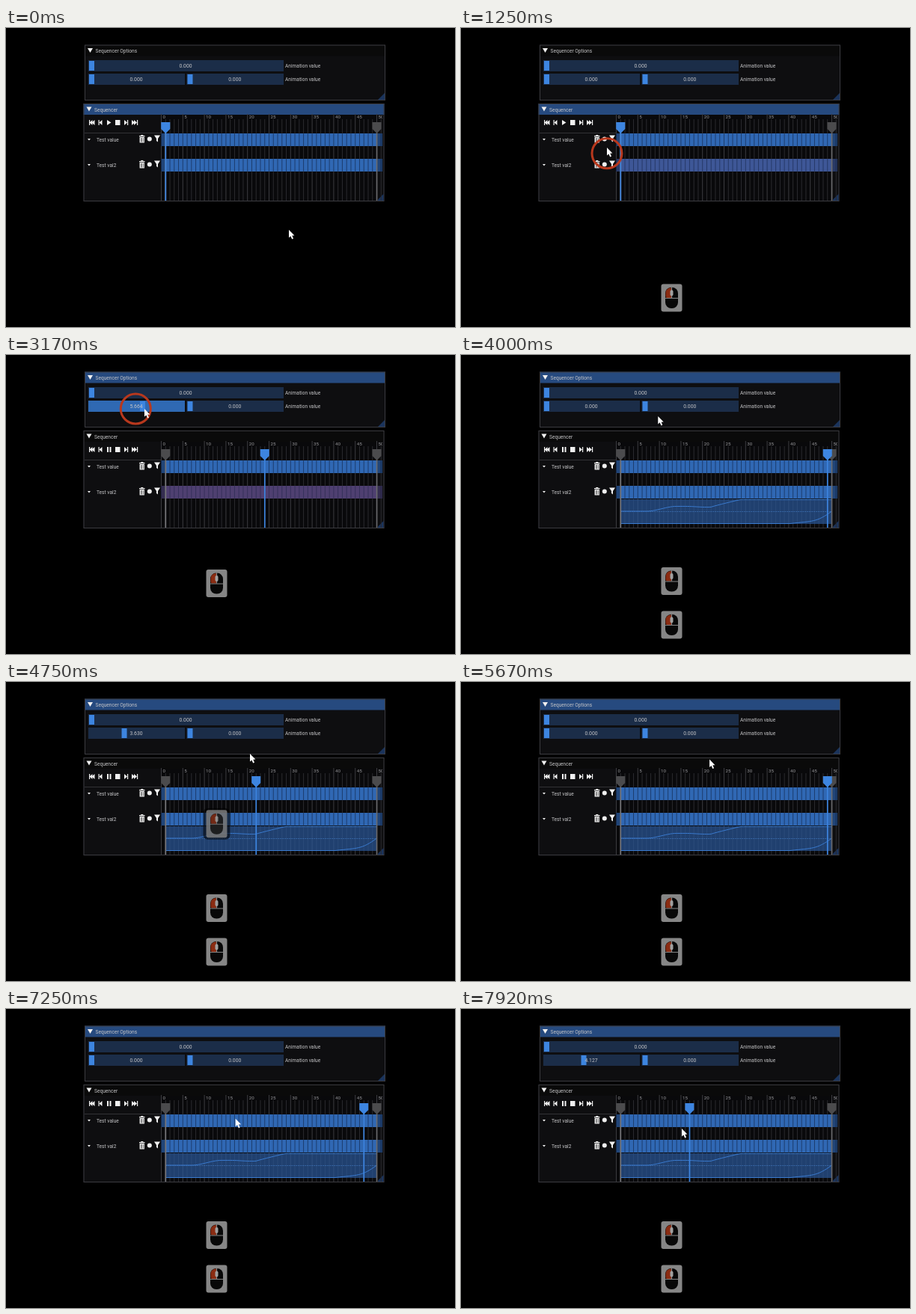
An HTML page with a canvas for the animation above (8 s loop, 600 by 400 pixels).

```html
<!DOCTYPE html>
<html lang="en">
<head>
<meta charset="utf-8">
<style>
html, body { margin: 0; width: 100%; height: 100%; overflow: hidden; background: #000; }
canvas { display: block; }
</style>
</head>
<body>
<canvas id="stage" width="600" height="400"></canvas>
<script>
const ctx = document.getElementById('stage').getContext('2d');
const LOOP = 8000, RECORD = 1080, DRAG = 2375, RELEASE = 3580;
const FRAME = 5.76, ORIGIN = 207.5, START = ORIGIN + FRAME, END = ORIGIN + 50 * FRAME;
const BLUE = '#3d85e0', WHITE = '#f0f0f0', GRAY = '#4b4b4d', BACK = '#0e0e10';

// Rows of [time, x, y]; the slider leads the cursor between DRAG and RELEASE
const stops = [
  [0, 378, 270], [170, 378, 270], [700, 196, 118], [920, 195, 176], [1150, 195, 176],
  [1250, 195, 160], [1700, 110, 56], [2050, 118, 69], [DRAG, 117, 70],
  [RELEASE, 237, 76], [4750, 326, 96], [6580, 338, 111], [7600, 295, 160], [LOOP, 295, 160]];

const clamp = v => Math.min(1, Math.max(0, v));
const smooth = (a, b, v) => (v = clamp((v - a) / (b - a)), v * v * (3 - 2 * v));

// Recorded curve over the playhead's frame number, 0 to 10
const recorded = k => Math.min(10,
  4.2 * smooth(6, 13, k) - .7 * smooth(15, 20, k) + 1.09 * Math.max(0, k - 20.9) ** .924);

const frameAt = t => t < DRAG ? 0 : Math.floor((t - DRAG) * .03) % 50;
const valueAt = t => frameAt(t) < 40 ? recorded(frameAt(t)) : 0;

function cursorAt(t) {
  if (t >= DRAG && t < RELEASE) return [117 + 12 * valueAt(t), 72];
  const i = Math.max(1, stops.findIndex(s => s[0] >= t));
  const a = stops[i - 1], b = stops[i], p = smooth(a[0], b[0], t);
  return [a[1] + (b[1] - a[1]) * p, a[2] + (b[2] - a[2]) * p];
}

function rect(x, y, w, h, color) {
  ctx.fillStyle = color;
  ctx.fillRect(x, y, w, h);
}

function poly(color, ...xy) {
  ctx.fillStyle = color;
  ctx.beginPath();
  for (let i = 0; i < xy.length; i += 2) ctx.lineTo(xy[i], xy[i + 1]);
  ctx.fill();
}

function box(x, y, w, h, r, color) {
  ctx.fillStyle = color;
  ctx.beginPath();
  ctx.roundRect(x, y, w, h, r);
  ctx.fill();
}

function text(str, x, y, align = 'left', color = '#c4c4c6', size = 6.6) {
  ctx.font = `${size}px Roboto, sans-serif`;
  ctx.textAlign = align;
  ctx.fillStyle = color;
  ctx.fillText(str, x, y);
}

function panel(title, x, y, w, h, focused) {
  rect(x, y, w, h, BACK);
  rect(x, y, w, 15, focused ? '#264a7f' : '#0a0a0a');
  ctx.strokeStyle = '#3b3b40';
  ctx.lineWidth = 1;
  ctx.strokeRect(x + .5, y + .5, w - 1, h - 1);
  poly('#1b345c', x + w - 1, y + h - 10, x + w - 1, y + h - 1, x + w - 10, y + h - 1);
  poly(WHITE, x + 4, y + 4.5, x + 11, y + 4.5, x + 7.5, y + 10.5);
  text(title, x + 14.5, y + 10.5);
}

function slider(x, y, w, value = 0, color = '#1b2d48') {
  rect(x, y, w, 15, color);
  rect(x + 1 + value / 10 * (w - 9), y + 1, 7, 13, BLUE);
  text(value.toFixed(3), x + w / 2 - .5, y + 10, 'center', '#c4c4c6', 6.8);
}

function toolbar(playing) {
  const arrow = (x, w) => poly(WHITE, x, 123, x + w, 126.5, x, 130);
  const bar = (x, w = 1.2) => rect(x, 123, w, 7, WHITE);
  for (const [x, dir] of [[115.5, -1], [118.5, -1], [128.5, -1], [158, 1], [168, 1], [171, 1]])
    arrow(x, 4 * dir);
  for (const x of [111, 123.5, 162, 175]) bar(x);
  if (playing) { bar(135, 2); bar(138.5, 2); }
  else arrow(135, 5.5);
  bar(146, 6.5);
}

function trackHead(name, y) {
  poly(WHITE, 109, y - 1, 113, y - 1, 111, y + 1.5);
  text(name, 121, y + 2.8);
  rect(178, y - 5, 7.5, 1.3, WHITE);
  rect(180.3, y - 6, 3, 1.2, WHITE);
  rect(178.6, y - 3, 6.3, 7.5, WHITE);
  for (let x = 180; x <= 183; x += 1.5) rect(x, y - 2, .6, 5.5, '#333');
  box(188.8, y - 3.5, 6, 6, 3, WHITE);
  poly(WHITE, 198, y - 5.5, 206, y - 5.5, 203, y - 1, 203, y + 3.5, 201, y + 2, 201, y - 1);
}

function track(y, red) {
  const mix = (a, b) => Math.round(a + (b - a) * red);
  rect(207, y, 296, 17, `rgb(${mix(48, 112)},${mix(104, 22)},${mix(180, 44)})`);
  for (let x = ORIGIN; x < 503; x += FRAME)
    rect(x - .5, y, 1, 17, `rgba(14,26,54,${.55 - .35 * red})`);
  rect(207, y, START - 207, 17, 'rgba(10,15,30,.4)');
  rect(END, y, 503 - END, 17, 'rgba(10,15,30,.4)');
}

function grid() {
  ctx.save();
  ctx.beginPath();
  ctx.rect(207, 115, 296, 116);
  ctx.clip();
  for (let i = 0; i <= 51; i++) {
    const x = ORIGIN + i * FRAME, major = i % 5 == 0, top = major ? 115 : 122;
    rect(x - .5, top, 1, 231 - top, major ? '#3c3c40' : '#2b2b2f');
    if (major) text(i, x + 2, 121, 'left', '#97979a', 6.2);
  }
  ctx.restore();
}

function curves() {
  rect(START, 193, END - START, 33, 'rgba(42,86,150,.72)');
  ctx.lineWidth = 1;
  ctx.strokeStyle = 'rgba(75,135,215,.5)';
  ctx.setLineDash([2, 1]);
  ctx.beginPath();
  ctx.moveTo(START, 209.5);
  ctx.lineTo(END, 209.5);
  ctx.stroke();
  ctx.setLineDash([]);
  ctx.strokeStyle = '#3a7bd0';
  ctx.beginPath();
  for (let k = 0; k <= 49; k += .5) ctx.lineTo(START + k * FRAME, 209 - 1.56 * recorded(k));
  ctx.moveTo(START, 225.5);
  ctx.lineTo(440, 225.5);
  ctx.bezierCurveTo(470, 222, 475, 224, END, 209);
  ctx.stroke();
}

function marker(x, color, stem) {
  rect(x - .8, 138, 1.7, 93, stem);
  poly(color, x - 6, 126, x + 6, 126, x + 6, 135, x, 141, x - 6, 135);
}

function mouseIcon(y, alpha = 1) {
  ctx.save();
  ctx.globalAlpha = alpha;
  ctx.translate(281.5, y);
  box(-18, -21, 36, 42, 6, 'rgba(0,0,0,.75)');
  box(-14, -18.5, 28, 37, 3, '#868686');
  box(-8.5, -14, 17, 28, 8, '#080808');
  box(-8, -13.5, 7.5, 13.5, [7, 0, 0, 2], '#8a2c12');
  rect(-9, 0, 18, 1, '#868686');
  rect(-.6, -14.5, 1.2, 14.5, '#868686');
  box(-2, -10.5, 4, 8, 2, '#a0a0a0');
  ctx.restore();
}

function pointer(x, y) {
  const edge = [0, 0, 0, 10.5, 2.4, 8.4, 4.2, 12.5, 6, 11.7, 4.3, 7.8, 7.4, 7.6];
  poly('#fff', ...edge.map((v, i) => v + (i % 2 ? y : x)));
}

function draw(t) {
  const playing = t >= DRAG, dragging = playing && t < RELEASE;
  const recording = t >= RECORD && t < RELEASE;
  const red = recording ? Math.abs(Math.sin((t - RECORD) / 1250 * Math.PI / 2)) : 0;
  const hover = !playing && t > 1850;

  rect(0, 0, 600, 400, '#000');
  panel('Sequencer Options', 105, 22.5, 402, 74.5, playing);
  slider(110, 43, 261);
  slider(110, 61, 129, valueAt(t), dragging ? '#2f69b3' : hover ? '#23446f' : undefined);
  slider(241.5, 61, 129.5);
  text('Animation value', 373, 53);
  text('Animation value', 373, 71);

  panel('Sequencer', 103.5, 101, 402, 131, !playing);
  rect(207, 116, 290, 115, '#09090b');
  grid();
  toolbar(playing);
  rect(105, 140, 102, 1, '#323236');
  rect(207, 116, 1, 115, '#3c3c40');
  trackHead('Test value', 149);
  trackHead('Test val2', 183);
  track(141, 0);
  track(175, red);
  if (t >= RELEASE) curves();
  marker(START, GRAY, '#77777a');
  marker(END, GRAY, '#6a6a6d');
  marker(START + frameAt(t) * FRAME, BLUE, BLUE);

  if (t >= RECORD) {
    const rise = 58.5 * clamp((t - DRAG) / 840) + Math.max(0, t - 4300) * .25;
    if (t >= 3380) { mouseIcon(302.5); mouseIcon(361); }
    mouseIcon(361 - rise, clamp((5080 - t) / 420));
  }
  if (dragging || t >= RECORD && t < 1330) {
    ctx.strokeStyle = '#b8381d';
    ctx.lineWidth = 3;
    ctx.beginPath();
    ctx.arc(...cursorAt(t - 50), 20, 0, 7);
    ctx.stroke();
  }
  pointer(...cursorAt(t));
}

function tick() {
  draw(performance.now() % LOOP);
  requestAnimationFrame(tick);
}
tick();
</script>
</body>
</html>
```
